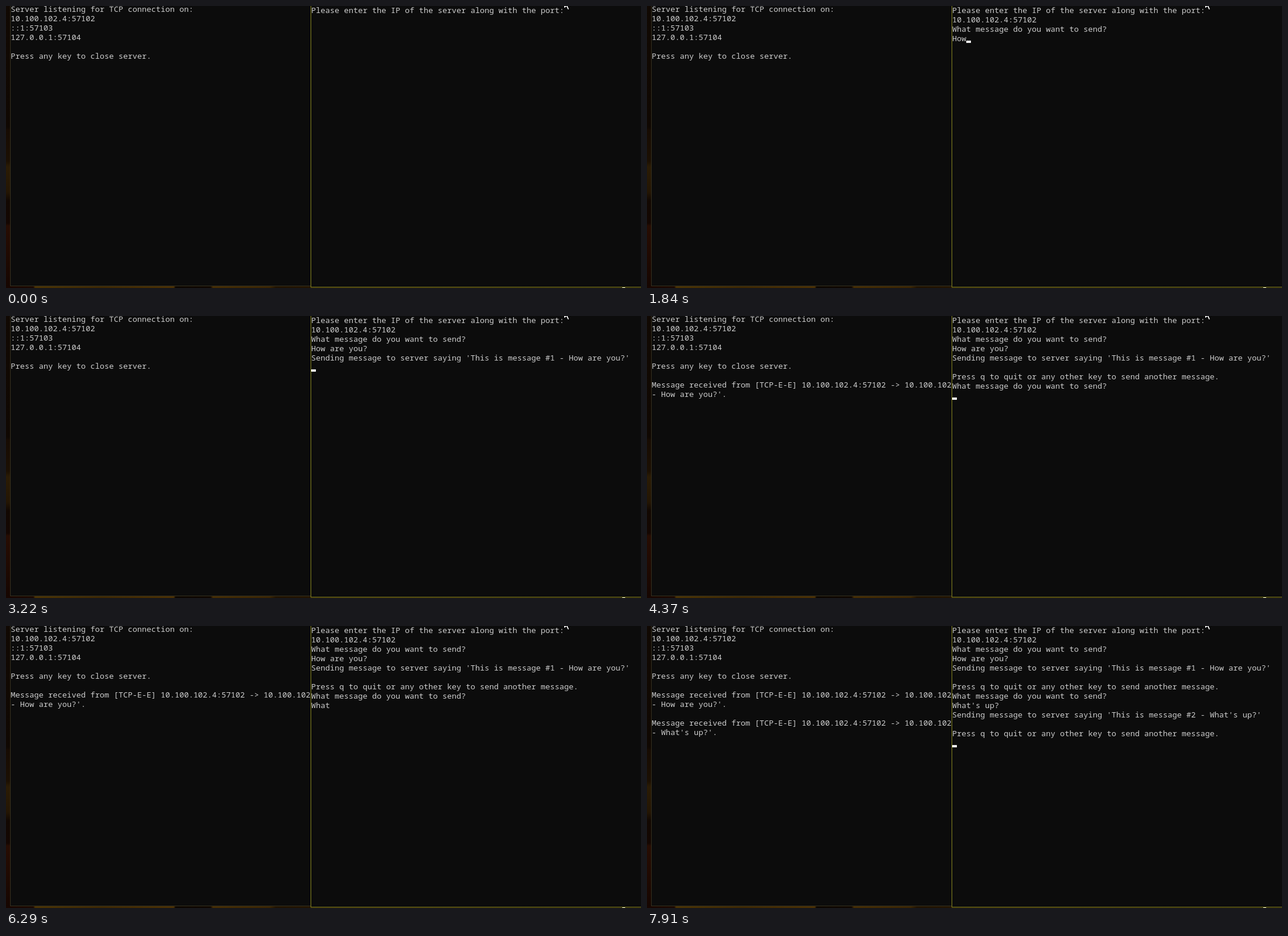
These frames come from a looping animation (1084x481 px, 7.99 s). An HTML page with a canvas:

```html
<!DOCTYPE html>
<html lang="en">
<head>
<meta charset="utf-8">
<title>Server and client consoles</title>
<style>
  html, body { margin: 0; width: 100%; height: 100%; overflow: hidden; background: #0c0c0c; }
  canvas { display: block; }
</style>
</head>
<body>
<canvas id="stage" width="1084" height="481"></canvas>
<script>
const LOOP = 7990;
const CELL = 8, ROW = 16;
const ctx = document.getElementById("stage").getContext("2d");

// Each event prints its text at the given time in ms.
const type = (text, times) => [...text].map((char, i) => [times[i], char]);

const ASK = "What message do you want to send?\n";
const AGAIN = "\nPress q to quit or any other key to send another message.\n";
const sending = (n, text) => `\nSending message to server saying 'This is message #${n} - ${text}'\n`;
const received = text =>
  `\nMessage received from [TCP-E-E] 10.100.102.4:57102 -> 10.100.102\n- ${text}'.\n`;

const client = [
  [0, "Please enter the IP of the server along with the port:\n"],
  [300, "10.100.102.4:57102"],
  [1150, "\n" + ASK],
  ...type("How are you?", [1510, 1620, 1760, 1880, 1960, 2050, 2140, 2230, 2330, 2430, 2520, 2740]),
  [3000, sending(1, "How are you?")],
  [3700, AGAIN],
  [4300, ASK],
  ...type("What's up?", [5480, 5580, 5670, 5765, 6400, 6500, 6590, 6680, 6760, 6850]),
  [7050, sending(2, "What's up?")],
  [7500, AGAIN]
];

const server = [
  [0, "Server listening for TCP connection on:\n10.100.102.4:57102\n::1:57103\n" +
      "127.0.0.1:57104\n\nPress any key to close server.\n"],
  [3700, received("How are you?")],
  [7500, received("What's up?")]
];

function rect(color, x, y, w, h) {
  ctx.fillStyle = color;
  ctx.fillRect(x, y, w, h);
}

function fade(x, y, w, h, vertical, stops) {
  const g = ctx.createLinearGradient(x, y, vertical ? x : x + w, vertical ? y + h : y);
  stops.forEach(([at, color]) => g.addColorStop(at, color));
  rect(g, x, y, w, h);
}

function drawDesktop() {
  fade(0, 0, 7, 481, true, [
    [0, "#110903"], [0.43, "#100802"], [0.44, "#170c03"], [0.55, "#1c1003"],
    [0.57, "#2b1c05"], [0.66, "#241604"], [0.69, "#120802"], [0.77, "#140702"],
    [0.78, "#270d03"], [0.88, "#200a02"], [1, "#160601"]
  ]);
  fade(0, 478, 1084, 3, false, [
    [0, "#180601"], [0.043, "#1c0901"], [0.046, "#4a3304"], [0.15, "#3d2803"],
    [0.264, "#4a3004"], [0.267, "#0d0702"], [0.322, "#100802"], [0.326, "#452d04"],
    [0.415, "#3a2503"], [0.425, "#201302"], [0.6, "#2b1a03"], [0.8, "#1c1002"], [1, "#120a02"]
  ]);
}

function drawText(text, x, baseline) {
  ctx.font = "13.3333px 'Noto Sans Mono', 'DejaVu Sans Mono', monospace";
  ctx.fillStyle = "#cccccc";
  text.split("\n").forEach((line, i) => ctx.fillText(line, x, baseline + i * ROW));
}

function drawPointer(x, y) {
  const shape = [[0, 0], [0, 16], [4, 12.5], [6.5, 18], [9, 17], [6.5, 11.5], [11.5, 11.5]];
  ctx.beginPath();
  shape.forEach(([dx, dy]) => ctx.lineTo(x + dx, y + dy));
  ctx.closePath();
  ctx.lineWidth = 1;
  ctx.strokeStyle = "#000";
  ctx.fillStyle = "#fff";
  ctx.fill();
  ctx.stroke();
}

function printed(events, t) {
  return events.filter(([at]) => at <= t).map(([, text]) => text).join("");
}

// The caret blinks on a fixed beat and stays lit shortly after new output.
function caretLit(t) {
  const last = Math.max(...client.map(([at]) => at).filter(at => at <= t));
  const phase = t % 1060;
  return (phase >= 280 && phase < 810) || (last > 0 && t - last < 500);
}

function draw(t) {
  drawDesktop();

  rect("#35301f", 7, 0, 514, 478);
  rect("#0c0c0c", 8, 0, 512, 477);
  drawText(printed(server, t), 8, 10);

  rect("#85841f", 520, 0, 564, 480);
  rect("#0c0c0c", 521, 0, 563, 479);
  const text = printed(client, t);
  drawText(text, 521, 12);
  if (caretLit(t)) {
    const lines = text.split("\n");
    const row = lines.length - 1;
    rect("#f2f2f2", 521 + lines[row].length * CELL, row * ROW + 11, CELL, 4);
  }

  rect("#d8d8d8", 1052, 480, 5, 1);
  drawPointer(952.5, -11.5);
}

const start = performance.now();
function tick() {
  draw((performance.now() - start) % LOOP);
  requestAnimationFrame(tick);
}
tick();
</script>
</body>
</html>
```
